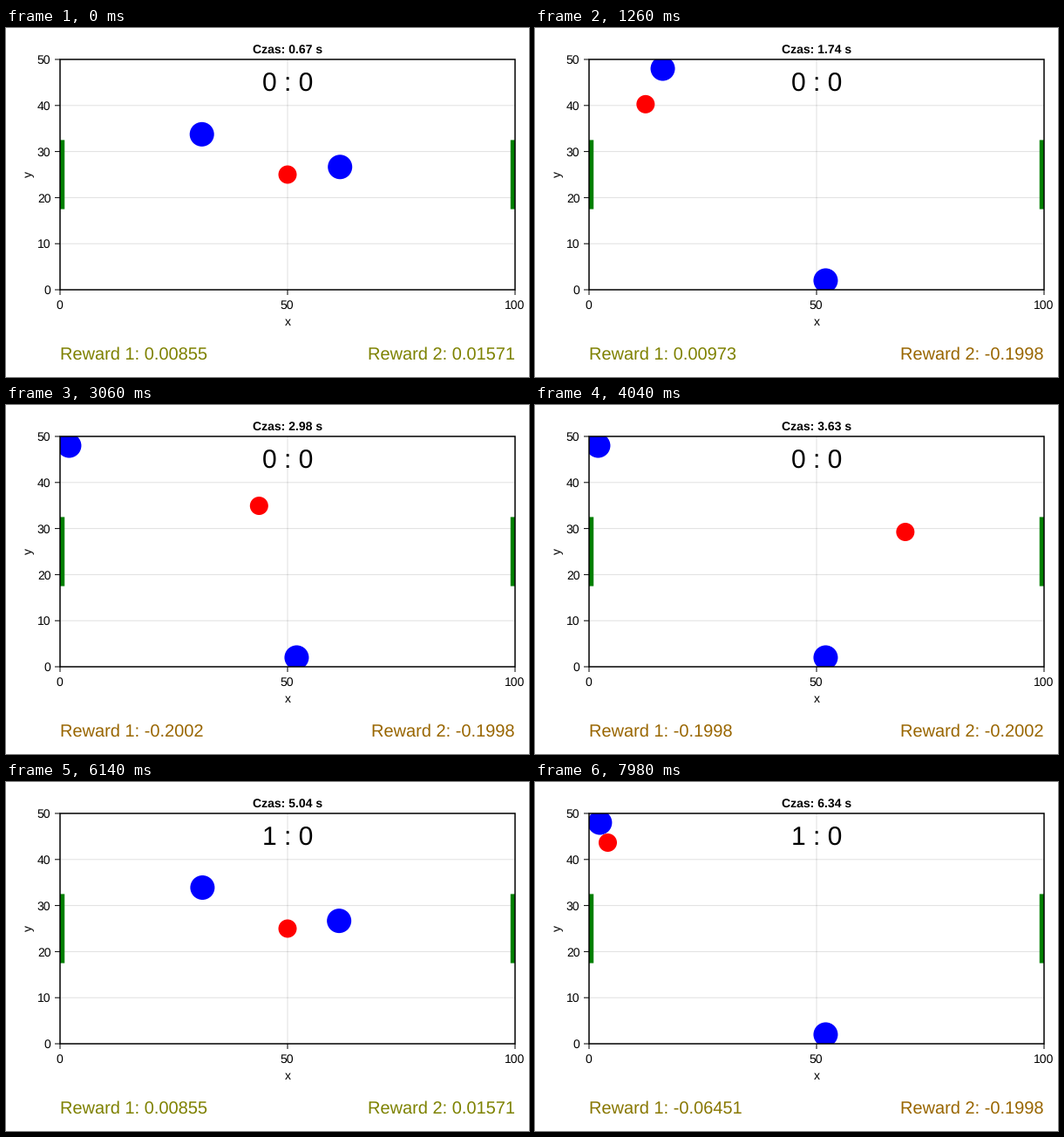
Recreate the animation shown at these times as a matplotlib script. Size 600 by 400 pixels, loop 8000 ms.

```python
import numpy as np
import matplotlib.pyplot as plt
from matplotlib.animation import FuncAnimation
from matplotlib.patches import Circle, Rectangle

W, H, DPI = 600, 400, 100
L, R, T, B = 62, 584, 36, 300          # pitch edges in pixels
PX = 72 / DPI                          # points per pixel
TICK, LOOP = 20, 8000
GOAL, KICK, TURN, HIT = 4.36, 0.681, 1.31, 1.98   # seconds
LIFT = 3.9

plt.rcParams["font.family"] = "Liberation Sans"
plt.rcParams["text.hinting"] = "none"
plt.rcParams["text.hinting_factor"] = 1
fig = plt.figure(figsize=(W / DPI, H / DPI), dpi=DPI, facecolor="white")
ax = fig.add_axes([0, 0, 1, 1])
ax.set_xlim(0, W)
ax.set_ylim(H, 0)
ax.axis("off")


def px(x, y):
    """Pitch units (100 by 50) to pixels."""
    return L + x * (R - L) / 100, B - y * (B - T) / 50


def line(xs, ys, color="black"):
    ax.plot(xs, ys, color=color, lw=PX, zorder=1, snap=False,
            solid_capstyle="butt")


def label(x, y, text, size=14, ha="center", **kw):
    kw.setdefault("va", "baseline")
    return ax.text(x, y, text, fontsize=size * PX, ha=ha, zorder=8, **kw)


def box(x, y, w, h, z, **kw):
    ax.add_patch(Rectangle((x, y), w, h, zorder=z, snap=False, **kw))


def disc(radius, color, z):
    c = Circle((0, 0), radius, fc=color, ec="none", zorder=z)
    ax.add_patch(c)
    c.set_clip_path(Rectangle((L, T), R - L, B - T, transform=ax.transData))
    return c


def draw_pitch():
    grid = (0, 0, 0, 0.12)
    for v in range(0, 51, 10):
        y = px(0, v)[1]
        if 0 < v < 50:
            line([L, R], [y, y], grid)
        line([L - 6, L], [y, y])
        label(L - 10.5, y + 5, str(v), ha="right")
    for v in (0, 50, 100):
        x = px(v, 0)[0]
        if v == 50:
            line([x, x], [T, B], grid)
        line([x, x], [B, B + 6])
        label(x - 0.5, B + 22, str(v))
    for v in (0, 99):
        x, y = px(v, 32.5)
        box(x, y, (R - L) / 100, 15 * (B - T) / 50, 2, fc="green", ec="none")
    box(L, T, R - L, B - T, 6, fill=False, ec="black", lw=1.5 * PX)
    label(323, 341, "x")
    label(26, 167.5, "y", rotation=90, va="center")


def after(t, start):
    return max(t - start, 0)


def ball_at(t):
    # rests, flies to the corner, then rebounds into the right goal
    a, b = min(after(t, KICK), HIT - KICK), after(t, HIT)
    return 50 - 35.32 * a + 39.62 * b, 25 + 14.36 * a - 8.72 * b


def left_at(t):
    # speeds up towards the top, then dashes into the corner
    u = min(t, TURN)
    x = 25 + 5.45 * u + 5.61 * u**2 - 58.8 * after(t, TURN)
    return max(x, 2), min(25 + 10.68 * t + 3.54 * t**2, 48)


def right_at(t):
    # runs inwards, dives to the bottom edge and rises again late on
    y = 25 + 2.47 * t - 95 * after(t, KICK)**2
    return max(75 - 20.1 * t, 52), max(y, 2) + 20.1 * after(t, LIFT)


def rewards(t):
    side = 0.0002 if ball_at(t)[0] <= 50 else -0.0002
    corner = np.clip((t - 1.82568) * 0.41673, 0, 0.2)
    edges = (t > 1.2) + (t > 1.6) - int(t > LIFT)
    r1, r2 = -side - corner, side - 0.1 * edges
    if t > 0.6 and corner == 0:
        r1 = 0.00855 if t < 1 else 0.00973
    if 0.6 < t < 1:
        r2 = 0.01571
    return r1, r2


def clock(step):
    return float(np.interp(step, [0, 14, 43, 65, 106, 131, 171],
                           [0.67, 1.31, 2.28, 2.98, 4.25, 5.04, 6.34]))


draw_pitch()
left, right = disc(14, "blue", 3), disc(14, "blue", 3)
ball = disc(10.5, "red", 4)
title = label(323, 29, "", weight="bold")
score = label(323, 73, "", size=30)
notes = [label(L, 380, "", size=20, ha="left"),
         label(R, 380, "", size=20, ha="right")]


def update(k):
    # three steps per 140 ms, held for 20, 100 and 20 ms
    cycle, rest = divmod(k * TICK, 140)
    t = clock(3 * cycle + (rest >= 20) + (rest >= 120))
    goals = int(t >= GOAL)
    rel = t - goals * GOAL
    for item, where in ((ball, ball_at), (left, left_at), (right, right_at)):
        item.center = px(*where(rel))
    title.set_text(f"Czas: {round(t, 2)} s")
    score.set_text(f"{goals} : 0")
    for i, (note, r) in enumerate(zip(notes, rewards(rel)), 1):
        note.set_text(f"Reward {i}: {round(float(r), 5)}")
        note.set_color((0.5 - r / 2, 0.5 + r / 2, 0))
    return ball, left, right, title, score, *notes


anim = FuncAnimation(fig, update, frames=LOOP // TICK, interval=TICK,
                     init_func=lambda: update(0), repeat=True,
                     repeat_delay=0)
plt.show()
```
